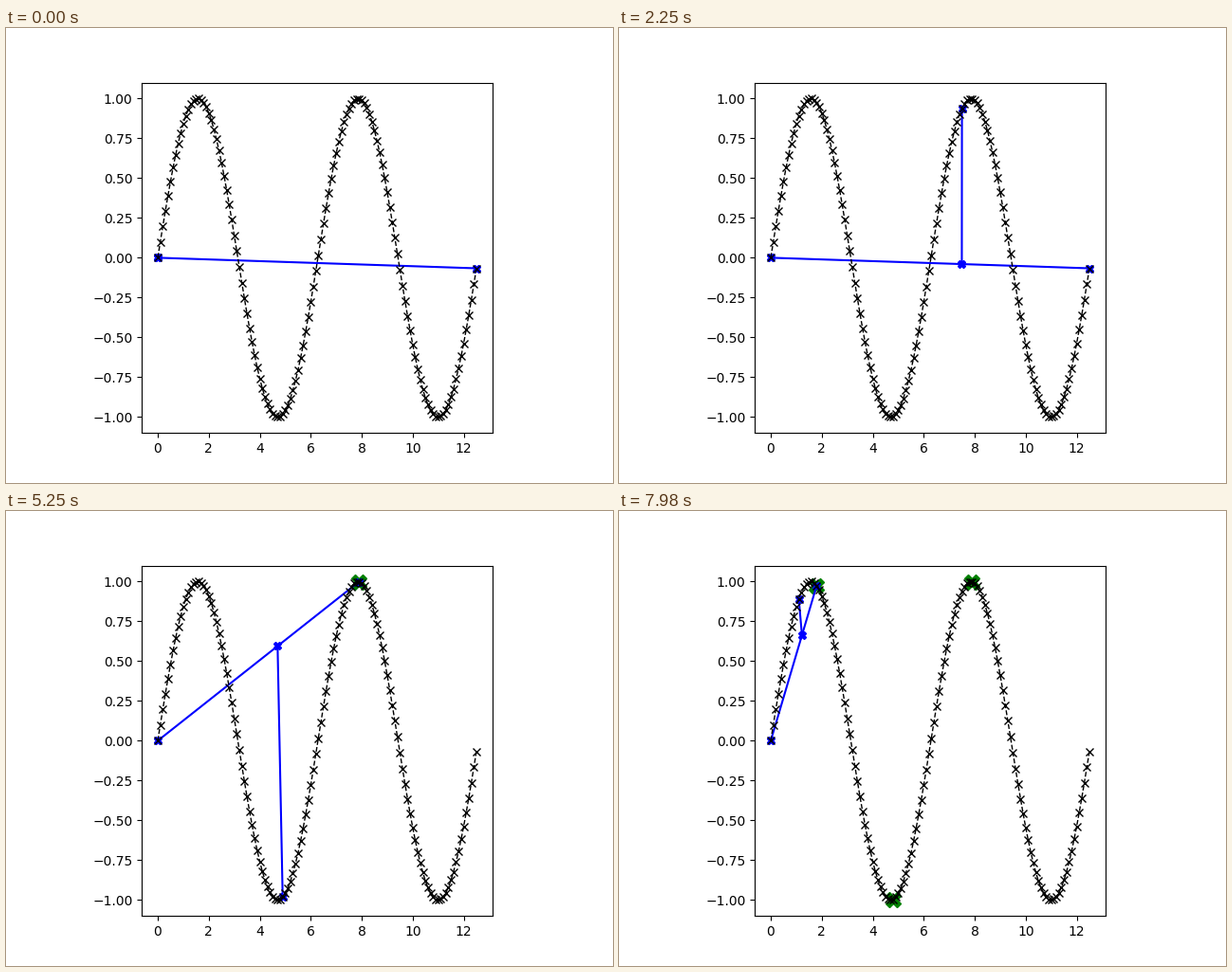
Animation, 640 px wide and 480 px high, one loop 8 s. Source, as a matplotlib script:

```python
import numpy as np
import matplotlib.pyplot as plt
from matplotlib.animation import FuncAnimation

LOOP_MS = 8000
FRAMES = 267

x = np.arange(0, 4 * np.pi, 0.1)
points = np.column_stack([x, np.sin(x)])


def feet(last):
    """Project every point up to `last` onto the chord from the first point."""
    start = points[0]
    chord = points[last] - start
    t = (points[:last + 1] - start) @ chord / (chord @ chord)
    return start + t[:, None] * chord


def simplify_steps():
    """Yield (chord end, tested point, its foot, kept points), always going left."""
    last, kept = len(points) - 1, []
    while last > 1:
        foot = feet(last)
        for i in range(last + 1):
            yield last, i, foot[i], list(kept)
        gaps = np.linalg.norm(points[:last + 1] - foot, axis=1)
        last = int(np.argmax(gaps))
        kept.append(last)


steps = list(simplify_steps())[:FRAMES]

fig, ax = plt.subplots(figsize=(6.4, 4.8), dpi=100)
ax.set_box_aspect(1)
ax.plot(x, points[:, 1], "k--x", lw=1, zorder=4)
ax.set_xlim(ax.get_xlim())
ax.set_ylim(ax.get_ylim())

kept_marks, = ax.plot([], [], "gX", ms=12, zorder=2)
chord_line, = ax.plot([], [], "b-X", zorder=3)
gap_line, = ax.plot([], [], "b-X", zorder=3)


def draw(n):
    last, i, foot, kept = steps[n]
    kept_marks.set_data(*points[kept].T if kept else ([], []))
    chord_line.set_data(*points[[0, last]].T)
    gap_line.set_data(*np.array([points[i], foot]).T)
    return kept_marks, chord_line, gap_line


anim = FuncAnimation(fig, draw, frames=FRAMES, init_func=lambda: draw(0),
                     interval=LOOP_MS / FRAMES, repeat=True, repeat_delay=0)
plt.show()
```
